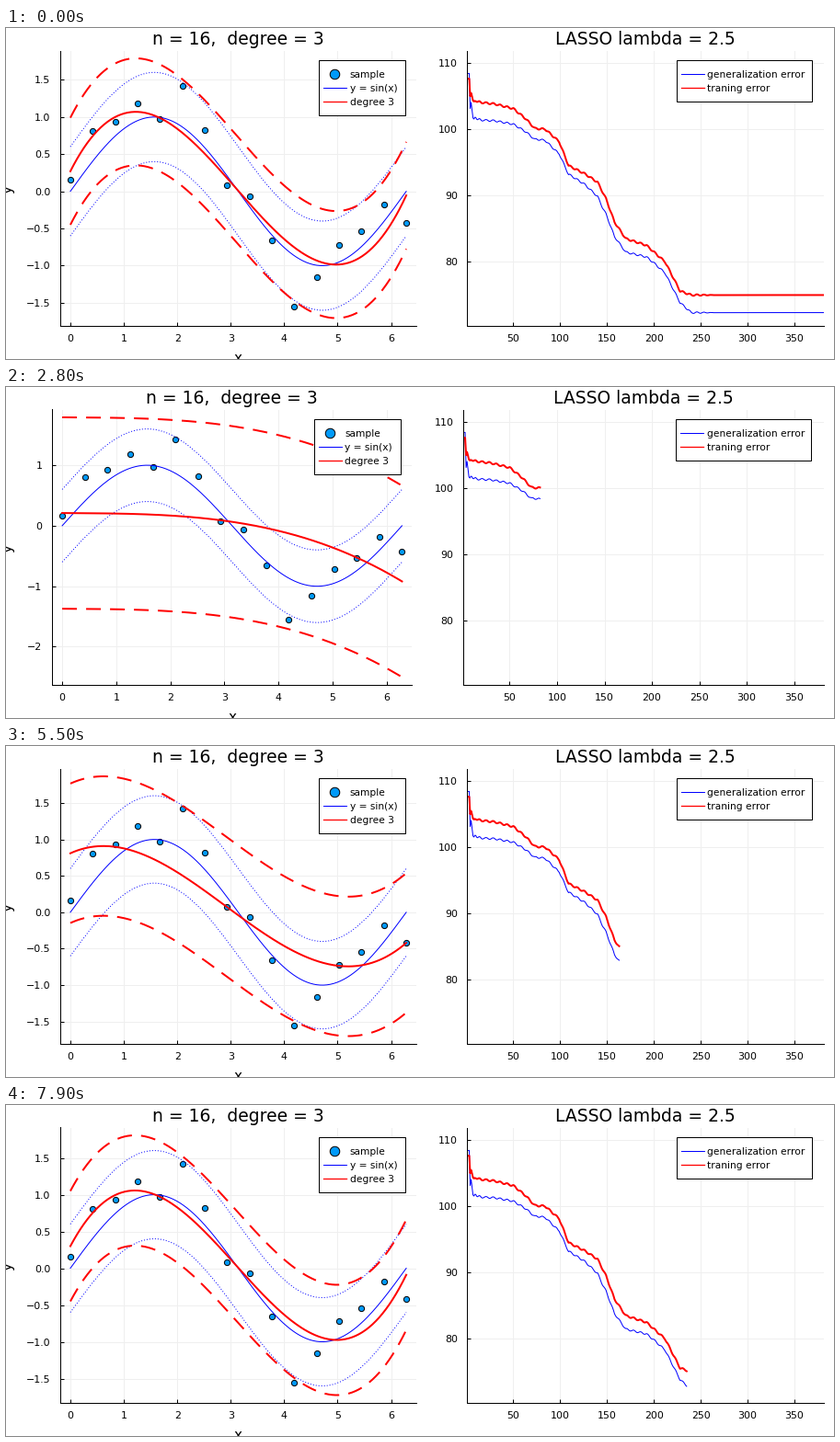
A matplotlib script that plays this animation: 900x360 px, repeating every 8000 ms.

```python
import numpy as np
import matplotlib.pyplot as plt
from matplotlib.animation import FuncAnimation
from matplotlib.patches import Rectangle
from matplotlib.transforms import Affine2D

W, H, FRAMES, LAST = 900, 360, 80, 381
TOP, BOTTOM = 24.5, 324
plt.rcParams.update({"font.family": "DejaVu Sans", "font.size": 11})

# Noisy samples of sin(x)
xs = np.linspace(0, 2 * np.pi, 16)
ys = [.16, .81, .93, 1.18, .97, 1.42, .82, .08,
      -.07, -.66, -1.55, -1.16, -.72, -.54, -.18, -.42]
x = np.linspace(0, 2 * np.pi, 200)
nodes = np.linspace(0, 2 * np.pi, 4)

# Key poses by step: the cubic at four nodes, then the band's half width
POSES = {
    31: (.02, -.014, -.25, -.89, 1.985),
    82: (.21, .163, -.127, -.92, 1.582),
    115: (.56, .21, -.4, -.586, 1.13),
    163: (.81, .506, -.537, -.42, .957),
    205: (.72, .627, -.676, -.167, .945),
    235: (.30, .774, -.742, -.09, .75),
    LAST: (.27, .788, -.754, -.055, .72),
}


def pose(step):
    return [np.interp(step, list(POSES), col) for col in zip(*POSES.values())]


def error_curves(s):
    """Falling error with a start-up spike and a ripple that dies out."""
    trend = np.interp(
        s, [4, 30, 50, 63, 73, 84, 99, 109, 126, 140, 149, 158, 170,
            192, 212, 228, 240],
        [104.2, 103.8, 103.1, 101.6, 100.1, 100, 98.1, 94.5, 93.3, 92, 89.5,
         86, 83.5, 82.5, 80, 75.6, 75])
    gap = np.interp(s, [12, 50, 75, 98, 110, 126, 145, 200, 228, 240],
                    [2.7, 2.35, 1.6, 1.85, 1.3, 1.6, 2.35, 1.65, 1.75, 2.65])
    ripple = .13 * np.cos(2 * np.pi * (s - 231) / 7.5)
    trend += ripple / (1 + np.exp((s - 255) / 4))
    spike = np.exp((5 - s) / 3) * np.cos(np.pi * (s - 5.2) / 4.6) ** 2
    train = np.where(s <= 3, 107.6, trend + 1.2 * spike)
    general = np.where(s <= 3, 108.4, trend - gap + 2.5 * spike)
    return train, general


steps = np.arange(1, LAST + 1)
train, general = error_curves(steps)

fig = plt.figure(figsize=(W / 72, H / 72), dpi=72, facecolor="white")


def make_axes():
    ax = fig.add_axes([0, 0, 1, 1])
    ax.spines[["top", "right"]].set_visible(False)
    ax.spines[["left", "bottom"]].set_linewidth(1)
    ax.tick_params(direction="in", length=4, width=1)
    ax.tick_params(axis="x", pad=9)
    ax.tick_params(axis="y", pad=10.5)
    ax.grid(color="#efefef", linewidth=1)
    ax.set_axisbelow(True)
    return ax


def place(ax, left, right):
    ax.set_position([left / W, 1 - BOTTOM / H,
                     (right - left) / W, (BOTTOM - TOP) / H])


fit_ax, err_ax = make_axes(), make_axes()
pad = .03 * 2 * np.pi
fit_ax.set_xlim(-pad, 2 * np.pi + pad)
fit_ax.set_xticks(range(7))
err_ax.set(xlim=(1, LAST), ylim=(70.35, 111.85),
           xticks=range(50, 351, 50), yticks=range(80, 111, 10))

DOT = dict(marker="o", ls="none", mfc="#009afa", mec="black", mew=1)
BLUE, RED = dict(color="blue", lw=1), dict(color="red", lw=2)
fit_ax.plot(xs, ys, ms=6.2, **DOT)
fit_ax.plot(x, np.sin(x), **BLUE)
for shift in (.6, -.6):
    fit_ax.plot(x, np.sin(x) + shift, ls=(0, (1, 2)), **BLUE)
curve, = fit_ax.plot([], [], **RED)
bands = [fit_ax.plot([], [], ls=(0, (8, 5)), **RED)[0] for _ in range(2)]
gen_line, = err_ax.plot([], [], **BLUE)
train_line, = err_ax.plot([], [], **RED)

# Overlay in pixels for titles and legends
top = fig.add_axes([0, 0, 1, 1], zorder=5)
top.set(xlim=(0, W), ylim=(H, 0))
top.axis("off")


def legend(left, right, rows):
    move = Affine2D()
    tr = move + top.transData
    top.add_patch(Rectangle((left, 35), right - left, 15 * (len(rows) + 1),
                            fc="white", ec="black", lw=1, transform=tr))
    for i, (label, style) in enumerate(rows):
        y = 50 + 15 * i
        if "marker" in style:
            top.plot([left + 17], [y], ms=10.5, transform=tr, **style)
        else:
            top.plot([left + 5, left + 30], [y, y], transform=tr, **style)
        top.text(left + 34, y + 4, label, fontsize=10.6, transform=tr)
    return move


THIN_RED = dict(color="red", lw=1.3)
fit_move = legend(339.5, 433.5, [("sample", DOT), ("y = sin(x)", BLUE),
                                 ("degree 3", THIN_RED)])
err_move = legend(728.5, 875.5, [("generalization error", BLUE),
                                 ("traning error", THIN_RED)])
fit_title = top.text(0, 18, "n = 16,  degree = 3", fontsize=18.8, ha="center")
err_title = top.text(0, 18, "LASSO lambda = 2.5", fontsize=18.8, ha="center")
x_label = top.text(0, 364.5, "x", fontsize=15.3, ha="center")
top.text(9, 175, "y", fontsize=15.3, rotation=90, ha="right", va="center")


def layout(wide):
    left, right, err_left = (59, 446, 501.5) if wide else (50, 441.5, 497)
    place(fit_ax, left, right)
    place(err_ax, err_left, 888.5)
    mid = (left + right) / 2
    fit_title.set_x(mid)
    x_label.set_x(mid)
    err_title.set_x((err_left + 888) / 2)
    fit_move.clear().translate(0 if wide else -5, 0)
    err_move.clear().translate(0 if wide else -1, 0)


def draw(k):
    step = 3 * k - 2 if k else LAST
    *vals, half = pose(step)
    y = np.polyval(np.polyfit(nodes, vals, 3), x)
    curve.set_data(x, y)
    for band, sign in zip(bands, (1, -1)):
        band.set_data(x, y + sign * half)

    # Limits follow the data; a small span gets finer, wider tick labels
    lo = min(-1.6, (y - half).min())
    hi = max(1.6, (y + half).max())
    span = hi - lo
    lo, hi = lo - .03 * span, hi + .03 * span
    wide = span < 3.65
    gap = .5 if wide else 1
    ticks = np.arange(np.ceil(lo / gap), np.floor(hi / gap) + 1) * gap
    labels = [f"{t + 0:.{int(wide)}f}".replace("-", "\u2212") for t in ticks]
    fit_ax.set_yticks(ticks, labels)
    fit_ax.set_ylim(lo, hi)
    layout(wide)

    gen_line.set_data(steps[:step], general[:step])
    train_line.set_data(steps[:step], train[:step])


anim = FuncAnimation(fig, draw, frames=FRAMES, interval=100,
                     repeat=True, repeat_delay=0)
plt.show()
```
